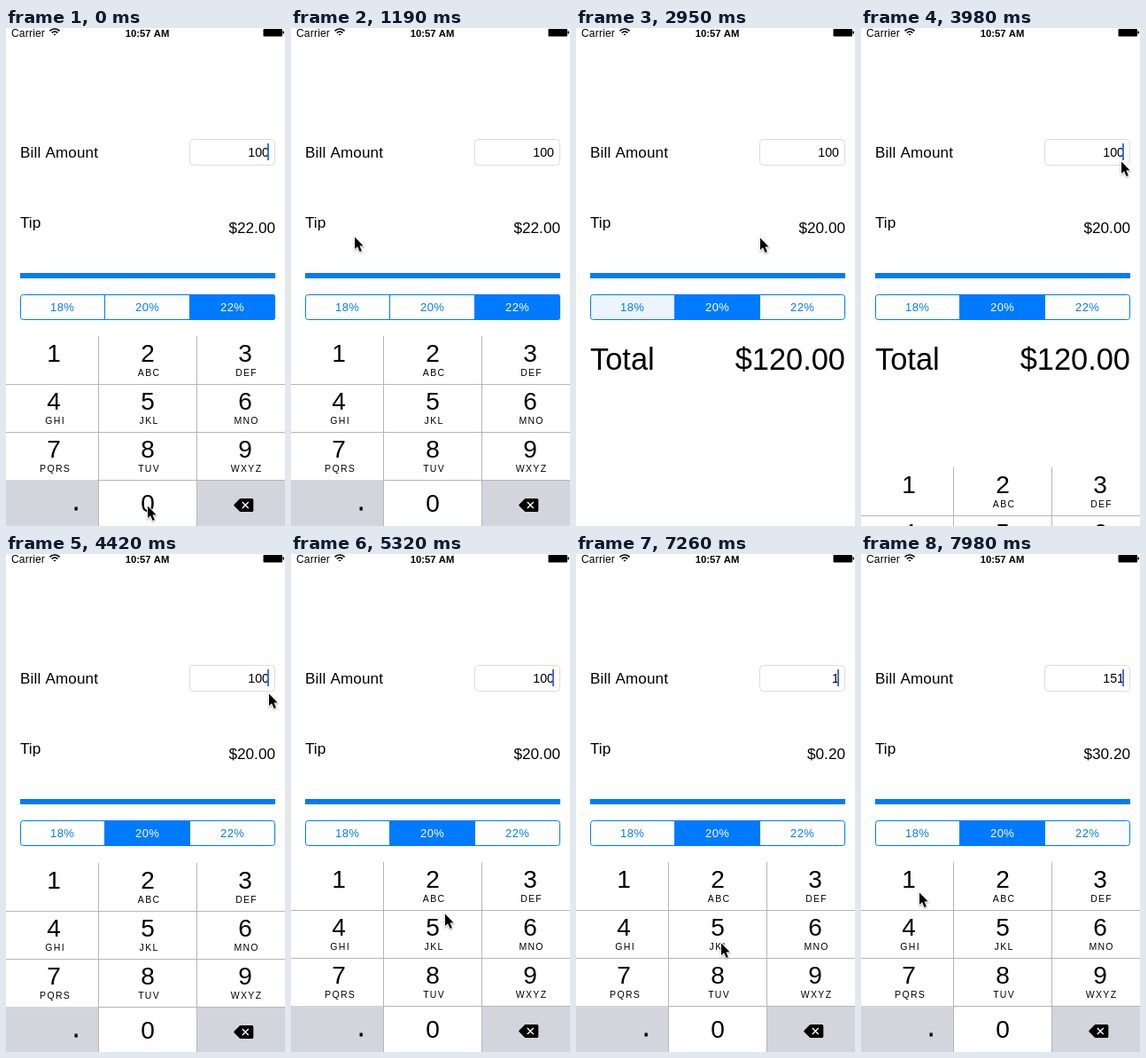
Recreate the animation shown at these times as an HTML page with a canvas. Size 315 by 561 pixels, loop 8000 ms.

```html
<!DOCTYPE html>
<html>
<head>
<meta charset="utf-8">
<style>
html, body { margin: 0; width: 100%; height: 100%; overflow: hidden; background: #fff }
canvas { display: block }
</style>
</head>
<body>
<canvas id="stage" width="315" height="561"></canvas>
<script>
const g = document.getElementById('stage').getContext('2d');
const LOOP = 8000, STEP = 147.6, BLUE = '#007aff', PALE = '#ebf4ff', GREY = '#d2d5db', LINE = '#b6b6b9';
const LETTERS = ['', 'ABC', 'DEF', 'GHI', 'JKL', 'MNO', 'PQRS', 'TUV', 'WXYZ'];
const RATES = [18, 20, 22];

// Pointer stops; those with an action press at that step and take effect on the next.
const stop = (at, x, y, action) => ({ at, x, y, ...action });
const STOPS = [
  stop(0, 160, 538),
  stop(8, 72, 235, { focus: false }),
  stop(14, 83, 310, { segment: 0 }),
  stop(19, 151, 310, { segment: 1 }),
  stop(26, 287, 135, { focus: true }),
  stop(30, 297, 157),
  stop(37, 174, 405),
  stop(43, 297, 498),
  stop(45, 271, 535, { key: 'del' }),
  stop(47, 271, 535, { key: 'del' }),
  stop(50, 164, 438, { key: 5 }),
  stop(53, 66, 381, { key: 1 })
];

const easeOut = u => 1 - (1 - Math.min(u, 1)) ** 3;

function stateAt(k) {
  const s = { bill: '100', selected: 2, focus: true, since: -3, drop: 0 };
  for (const { at, key, segment, focus } of STOPS) {
    if (at === k) {
      s.pressed = key;
      s.tinted = segment;
    }
    if (at >= k) break;
    if (key || focus) s.since = at + 1;
    if (key) s.bill = key === 'del' ? s.bill.slice(0, -1) : s.bill + key;
    if (segment !== undefined) {
      if (at === k - 1) s.tinted = s.selected;
      s.selected = segment;
    }
    if (focus !== undefined) {
      const left = remaining((k - at - .47) * STEP);
      s.focus = focus;
      s.drop = Math.round(214 * (focus ? left : 1 - left));
    }
  }
  s.caret = s.focus && (k - s.since) % 7 < 4;
  return s;
}

// share of a keyboard slide still to go, ms after its start
function remaining(ms) {
  const u = ms * .0143;
  return (1 + u) * Math.exp(-u);
}

function rect(color, x, y, w, h) {
  g.fillStyle = color;
  g.fillRect(x, y, w, h);
}

function roundRect(x, y, w, h, r) {
  g.beginPath();
  g.roundRect(x, y, w, h, r);
}

function outline(color, width = 1) {
  g.strokeStyle = color;
  g.lineWidth = width;
  g.stroke();
}

function text(str, x, y, size, { align = 'left', color = '#000', weight = '', spacing = 0 } = {}) {
  g.font = `${weight} ${size}px "Liberation Sans", Arial, sans-serif`;
  g.letterSpacing = spacing + 'px';
  g.textAlign = align;
  g.fillStyle = color;
  g.fillText(str, x, y);
}

function poly(points, x, y) {
  g.beginPath();
  points.forEach(([px, py]) => g.lineTo(x + px, y + py));
  g.closePath();
}

function statusBar() {
  text('Carrier', 6, 10, 12, { spacing: .2 });
  text('10:57 AM', 159.5, 9.6, 11.3, { align: 'center', weight: 'bold' });
  for (let i = 0; i < 3; i++) {
    g.beginPath();
    g.arc(55, 8.6, 1.2 + 3.2 * i, -Math.PI * .76, -Math.PI * .24);
    outline('#000', 1.7);
  }
  roundRect(290.5, 1, 21.5, 8.5, 1);
  g.fill();
  rect('#000', 312.5, 3.5, 1.5, 3);
}

function segments({ selected, tinted }) {
  g.save();
  roundRect(16, 300, 288, 29, 3);
  g.clip();
  RATES.forEach((rate, i) => {
    const x = 16 + i * 96, on = i === selected;
    rect(on ? BLUE : i === tinted ? PALE : '#fff', x, 300, 96, 29);
    text(rate + '%', x + 47.7, 319, 13, { align: 'center', color: on ? '#fff' : BLUE, spacing: .4 });
    if (i) rect(BLUE, x - 1, 300, 1, 29);
  });
  g.restore();
  roundRect(16.5, 300.5, 287, 28, 3);
  outline(BLUE);
}

function form(state) {
  const bill = +state.bill, tip = bill * RATES[state.selected] / 100;
  const right = { align: 'right' };
  text('Bill Amount', 16, 146, 17, { spacing: .2 });
  roundRect(207.5, 125.5, 96, 29, 4);
  outline('#dcdcdc');
  text(state.bill, 297, 145, 14.2, right);
  if (state.caret) rect('#426bf2', 295, 130, 2, 19);
  text('Tip', 16, 225, 17.2);
  text('$' + tip.toFixed(2), 304, 231, 17.2, right);
  rect(BLUE, 16, 276, 288, 6);
  segments(state);
  text('Total', 16, 385, 34.4);
  text('$' + (bill + tip).toFixed(2), 304, 385, 34.4, right);
}

function deleteIcon(x, y) {
  poly([[-9, 0], [-3, -6], [10, -6], [10, 6], [-3, 6]], x, y);
  g.fillStyle = '#000';
  g.lineJoin = 'round';
  g.fill();
  outline('#000', 3);
  g.beginPath();
  for (const d of [-3.5, 3.5]) {
    g.moveTo(x - 1, y - d);
    g.lineTo(x + 6, y + d);
  }
  outline('#fff', 1.4);
}

function keyboard({ drop, pressed }) {
  if (drop >= 213) return;
  const center = { align: 'center' };
  g.save();
  g.translate(0, drop);
  rect('#fff', 0, 347, 315, 216);
  LETTERS.forEach((letters, i) => {
    const col = i % 3, y = 347 + 54 * Math.floor(i / 3), mid = 54 + 108 * col - 2 * (col === 1);
    if (pressed === i + 1) rect(GREY, [0, 105, 216][col], y, col === 1 ? 110 : 104, 54);
    text(i + 1, mid, y + 29.4, 28, center);
    text(letters, mid + 1.6, y + 45, 10.5, { align: 'center', spacing: 1.3 });
  });
  text('0', 160, 545.4, 28, center);
  for (const y of [401, 455, 509]) rect(LINE, 0, y, 315, 1);
  rect(GREY, 0, 509, 104, 54);
  rect(pressed === 'del' ? '#fff' : GREY, 216, 510, 104, 54);
  rect('#000', 77.5, 539.5, 3.3, 4);
  for (const x of [104, 215]) rect(LINE, x, 347, 1, 216);
  deleteIcon(267.8, 537.5);
  g.restore();
}

function pointer(k) {
  const i = STOPS.findLastIndex(p => p.at <= k);
  const from = STOPS[i], to = STOPS[i + 1] ?? from;
  const f = easeOut((k - from.at) / Math.max(1, to.at - 1 - from.at));
  const along = axis => Math.round(from[axis] + (to[axis] - from[axis]) * f);
  poly([[0, 0], [0, 13.6], [3.1, 10.7], [5.6, 16.4], [7.9, 15.4], [5.5, 9.9], [9.5, 9.7]], along('x'), along('y') + .5);
  g.save();
  g.shadowColor = 'rgba(0,0,0,.35)';
  g.shadowBlur = 2;
  g.shadowOffsetY = 1;
  outline('#fff', 1.8);
  g.restore();
  g.fillStyle = '#000';
  g.fill();
}

function draw(ms) {
  const k = Math.floor((ms % LOOP + 10) / STEP), state = stateAt(k);
  rect('#fff', 0, 0, 315, 561);
  statusBar();
  form(state);
  keyboard(state);
  pointer(k);
}

let start;
function tick(now) {
  start ??= now;
  draw(now - start);
  requestAnimationFrame(tick);
}
draw(0);
requestAnimationFrame(tick);
</script>
</body>
</html>
```
